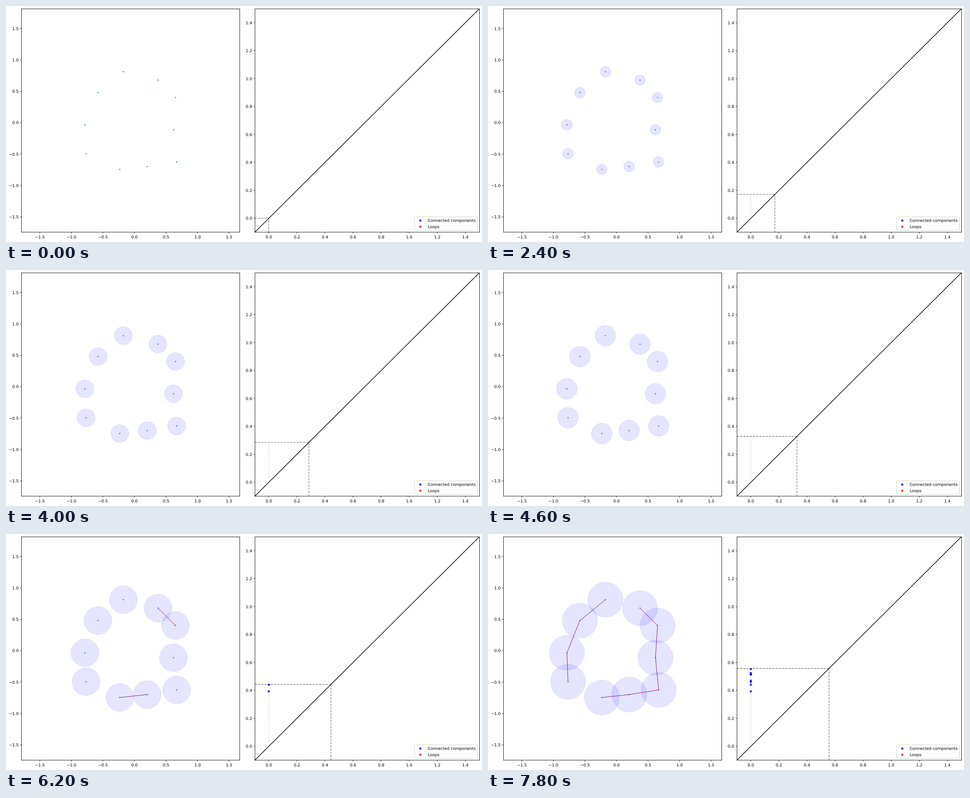
These frames come from a looping animation (1060x528 px, 8000 ms). An HTML page:

```html
<!DOCTYPE html>
<html lang="en">
<head>
<meta charset="utf-8">
<title>Growing discs and persistence diagram</title>
<style>
  html, body { margin: 0; width: 100%; height: 100%; overflow: hidden; background: #fff; }
  svg { display: block; width: 1060px; height: 528px; }
  text { font: 9px "DejaVu Sans", sans-serif; text-rendering: geometricPrecision; }
  .frame { fill: none; stroke: #000; stroke-width: .9; }
  .tick { stroke: #000; stroke-width: .8; }
  .disc { fill: #00f; fill-opacity: .1; stroke: #00f; stroke-opacity: .1; stroke-width: .9; }
  .edge { stroke: #800080; stroke-width: .9; }
  .guide { stroke: #808080; stroke-width: 1.35; stroke-dasharray: 5 2.16; }
  .life { stroke: #808080; stroke-opacity: .5; stroke-width: 1.35; stroke-dasharray: 1.35 2.23; }
</style>
</head>
<body>
<svg id="stage" viewBox="0 0 1060 528"></svg>
<script>
const NS = "http://www.w3.org/2000/svg";
const stage = document.getElementById("stage");
const STEP = 200, STEPS = 40;
const UNIT = 140.5;

// Sample points in stage pixels, clockwise from the top
const points = [
  [261.4, 147], [338.5, 165.8], [377.5, 204.8], [372.9, 276.8], [380, 348.9],
  [314.5, 359.2], [253.4, 365.8], [178.2, 330.6], [175.7, 265.8], [204.7, 193.8]
];

// Pairs of points with the diameter at which their discs meet
const merges = [
  [1, 2, .393], [5, 6, .4405], [7, 8, .4605], [4, 5, .47],
  [2, 3, .5134], [3, 4, .516], [0, 9, .5245], [8, 9, .5525]
];

const px = v => 585.3 + 312.5 * v;
const py = v => 474.9 - 312.5 * v;

function add(tag, attrs, parent = stage) {
  const el = document.createElementNS(NS, tag);
  set(el, attrs);
  return parent.appendChild(el);
}

function set(el, attrs) {
  for (const k in attrs) el.setAttribute(k, attrs[k]);
}

function line(cls, x1, y1, x2, y2) {
  return add("line", { class: cls, x1, y1, x2, y2 });
}

function label(str, x, y, anchor) {
  add("text", { x, y, "text-anchor": anchor }).textContent = str;
}

const format = v => v.toFixed(1).replace("-", "\u2212");

function tickX(v, x) {
  line("tick", x, 506, x, 509.3);
  label(format(v), x, 520.2, "middle");
}

function tickY(v, y, left) {
  line("tick", left - 3.3, y, left, y);
  label(format(v), left - 6.3, y + 3.3, "end");
}

// Left plot
for (const [cx, cy] of points) add("circle", { cx, cy, r: 1.25, fill: "#1f77b4" });
const discs = points.map(([cx, cy]) => add("circle", { class: "disc", cx, cy, r: 0 }));
const edges = merges.map(([a, b]) => line("edge", ...points[a], ...points[b]));
for (let i = -3; i <= 3; i++) {
  const v = i / 2;
  tickX(v, 286.1 + UNIT * v);
  tickY(v, 261.1 - UNIT * v, 34.5);
}
add("rect", { class: "frame", x: 34.5, y: 6.5, width: 486, height: 499.5 });

// Right plot
const life = line("life", px(0), py(0), px(0), py(0));
const guideH = line("guide", px(-.1), 0, 0, 0);
const guideV = line("guide", 0, py(-.1), 0, 0);
line("", px(-.1), py(-.1), px(1.5), py(1.5)).style.cssText = "stroke:#000;stroke-width:1.35";
const deaths = merges.map(m => add("circle", {
  cx: px(0), cy: py(m[2]), r: 2.5, fill: "#00f", "fill-opacity": .8
}));
for (let i = 0; i <= 7; i++) {
  tickX(i / 5, px(i / 5));
  tickY(i / 5, py(i / 5), 554.5);
}
add("rect", { class: "frame", x: 554.5, y: 6.5, width: 500, height: 499.5 });

// Legend
add("rect", {
  x: 909.9, y: 471.6, width: 140, height: 30, rx: 1.8,
  fill: "#fff", "fill-opacity": .8, stroke: "#ccc", "stroke-width": .9
});
[["Connected components", "#00f", 480], ["Loops", "#f00", 493.7]].forEach(([name, fill, y]) => {
  add("circle", { cx: 922.6, cy: y, r: 2.5, fill, "fill-opacity": .8 });
  label(name, 939, y + 3.2, "start");
});

function render(ms) {
  const size = Math.floor(ms / STEP) % STEPS / 70;
  const x = px(size), y = py(size);
  const show = (el, on) => set(el, { visibility: on ? "visible" : "hidden" });

  for (const d of discs) {
    set(d, { r: size / 2 * UNIT });
    show(d, size > 0);
  }
  merges.forEach((m, i) => {
    const met = size >= m[2];
    show(edges[i], met);
    show(deaths[i], met);
  });
  set(guideH, { x2: x, y1: y, y2: y });
  set(guideV, { x1: x, x2: x, y2: y });
  set(life, { y2: py(Math.min(size, merges[0][2])) });
}

const start = performance.now();
function tick() {
  render(performance.now() - start);
  requestAnimationFrame(tick);
}
tick();
</script>
</body>
</html>
```
